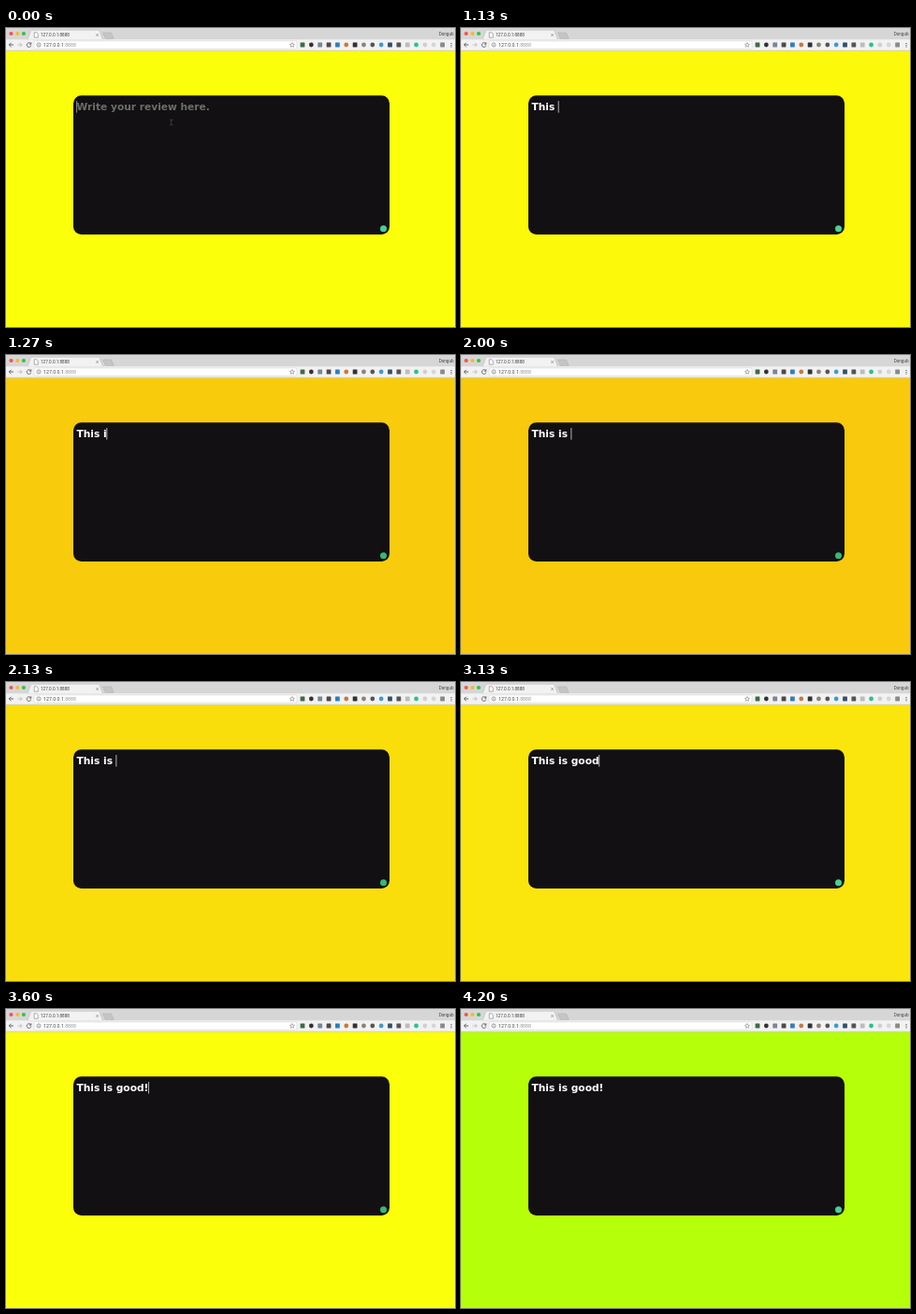
An HTML page for the animation above (4.39 s loop, 480x320 px).

```html
<!DOCTYPE html>
<html lang="en">
<head>
<meta charset="utf-8">
<title>Review mood</title>
<style>
html, body { margin: 0; width: 100%; height: 100%; overflow: hidden; }
svg { display: block; width: 480px; height: 320px; }
text { font-family: Roboto, "Liberation Sans", sans-serif; fill: #444; white-space: pre; }
#review { font: bold 10.65px "DejaVu Sans", Verdana, sans-serif; }
</style>
</head>
<body>
<svg viewBox="0 0 480 320">
  <rect id="page" width="480" height="320"/>

  <!-- tab strip -->
  <rect width="480" height="13" fill="#d7d6d7"/>
  <circle cx="5.5" cy="6" r="2.1" fill="#f2544d"/>
  <circle cx="12.3" cy="6" r="2.1" fill="#f5b731"/>
  <circle cx="18.9" cy="6" r="2.1" fill="#36c145"/>
  <path d="M23 12.5 L26.5 3.2 Q27 2.3 28 2.3 H98.5 Q99.5 2.3 100 3.2 L103.5 12.5Z" fill="#f3f2f3" stroke="#b5b5b5" stroke-width=".5"/>
  <path d="M103.5 5 H112.5 L115.3 11.3 H106.3Z" fill="#c6c5c6" stroke="#acacac" stroke-width=".5"/>
  <path d="M30.2 4.8 H32.8 L34.2 6.2 V10.2 H30.2Z" fill="#fff" stroke="#777" stroke-width=".6"/>
  <text x="37" y="9.2" font-size="4.65">127.0.0.1:8888</text>
  <path d="M96.3 6.2 l2.6 2.6 m0 -2.6 l-2.6 2.6" stroke="#666" stroke-width=".6"/>
  <text x="478.5" y="8" font-size="4.6" text-anchor="end">Dongub</text>

  <!-- toolbar -->
  <rect y="12.3" width="480" height="12" fill="#f3f2f3"/>
  <rect y="23.8" width="480" height=".7" fill="#c5c4ba"/>
  <g fill="none" stroke="#555" stroke-width=".9">
    <path d="M8 18 H3.4 M5.5 15.8 L3.3 18 L5.5 20.2"/>
    <path d="M12.5 18 H17 M15 15.8 L17.2 18 L15 20.2" stroke="#bbb"/>
    <path d="M26.3 16.6 A2.3 2.3 0 1 0 26.8 18.6 M26.8 15.4 V17.2 H25"/>
  </g>
  <rect x="30" y="13.9" width="281" height="8.4" rx="1.3" fill="#fff" stroke="#cfcfcf" stroke-width=".5"/>
  <circle cx="35" cy="18" r="2.1" fill="none" stroke="#666" stroke-width=".6"/>
  <path d="M35 16.7 v.6 M35 17.7 v1.5" stroke="#666" stroke-width=".6"/>
  <text x="40" y="19.9" font-size="5.25">127.0.0.1<tspan fill="#999">:8888</tspan></text>
  <path d="M306 15.6 l.7 1.6 1.8 .2 -1.3 1.2 .3 1.7 -1.5 -.9 -1.5 .9 .3 -1.7 -1.3 -1.2 1.8 -.2z" fill="none" stroke="#777" stroke-width=".6"/>
  <g id="tools"></g>
  <path d="M476 15.9 v4.6" stroke="#555" stroke-width="1.1" stroke-dasharray="1 .8"/>

  <!-- review box -->
  <rect x="72" y="72.3" width="338" height="148.8" rx="8.5" fill="#121012"/>
  <text id="review" x="75.5" y="88"></text>
  <rect id="caret" y="78" width=".9" height="12.6"/>
  <path id="pointer" d="M174.8 98 Q176.7 98 176.7 99 V103 Q176.7 104 174.8 104 M178.6 98 Q176.7 98 176.7 99 M176.7 103 Q176.7 104 178.6 104" fill="none" stroke="#4b494b" stroke-width=".8"/>
  <circle id="status" cx="403.5" cy="214.7" r="3.5"/>
</svg>
<script>
const LOOP = 4390, STEP = 200 / 3, LAST_STEP = 63;
const $ = id => document.getElementById(id);
const page = $("page"), review = $("review"), caret = $("caret"),
      pointer = $("pointer"), status_ = $("status");

const phrase = "This is good!";
const keyTimes = [460, 530, 660, 730, 860, 1195, 1395, 1660, 2460, 2595, 2730, 2860, 3595];
const checks = [[1195, 1860], [1930, 2330], [2590, 2990], [3590, 3930]];

// Each mood fades in from the colour before it.
const start = [252, 255, 10];
const moods = [
  { from: 1086, to: 1313, color: [248, 198, 12] },
  { from: 1960, to: 2130, color: [249, 222, 12] },
  { from: 3080, to: 3264, color: [252, 255, 10] },
  { from: 3690, to: 3920, color: [182, 255, 10] },
];

// Toolbar buttons from left to right; the round ones come with an "o".
const tools = ["#3f6b45", "o#333", "#7d8591", "#4b4b4b", "#2d7fc0", "o#c67a3c", "#333", "o#8d8377",
  "o#555", "o#3f9cd0", "#34506b", "#555", "#bdbdbd", "o#2cc387", "o#d0d0d0", "o#d6d6d6", "#8a8a8a"];
$("tools").innerHTML = tools.map((tool, i) => {
  const round = tool[0] === "o", x = 317 + i * 9.35;
  return `<rect x="${x - 2.4}" y="15.6" width="4.8" height="4.8" rx="${round ? 2.4 : 0.4}" fill="${tool.replace("o", "")}"/>`;
}).join("");

function moodAt(t) {
  return moods.reduce((color, mood) => {
    const u = Math.min(1, Math.max(0, (t - mood.from) / (mood.to - mood.from)));
    const k = u * u * (3 - 2 * u);
    return color.map((c, i) => c + (mood.color[i] - c) * k);
  }, start);
}

function draw(t) {
  const count = keyTimes.filter(k => k <= t).length;
  const lastKey = count ? keyTimes[count - 1] : -235;

  page.setAttribute("fill", `rgb(${moodAt(t).map(Math.round)})`);
  review.textContent = count ? phrase.slice(0, count) : "Write your review here.";
  review.style.fill = count ? "#fff" : "#6c6e69";

  const width = count ? review.getComputedTextLength() : 0;
  caret.setAttribute("x", 75.2 + width);
  caret.setAttribute("fill", count ? "#c4c4c4" : "#999");
  caret.style.opacity = (t - lastKey) % 1000 < 500 ? 1 : 0;
  pointer.style.opacity = count ? 0 : 1;

  const checking = checks.some(([a, b]) => t >= a && t < b);
  status_.setAttribute("fill", checking ? "#36b877" : "#45d295");
}

function tick() {
  const t = performance.now() % LOOP;
  draw(Math.min(LAST_STEP, Math.floor((t + 3.4) / STEP)) * STEP);
  requestAnimationFrame(tick);
}
tick();
</script>
</body>
</html>
```
